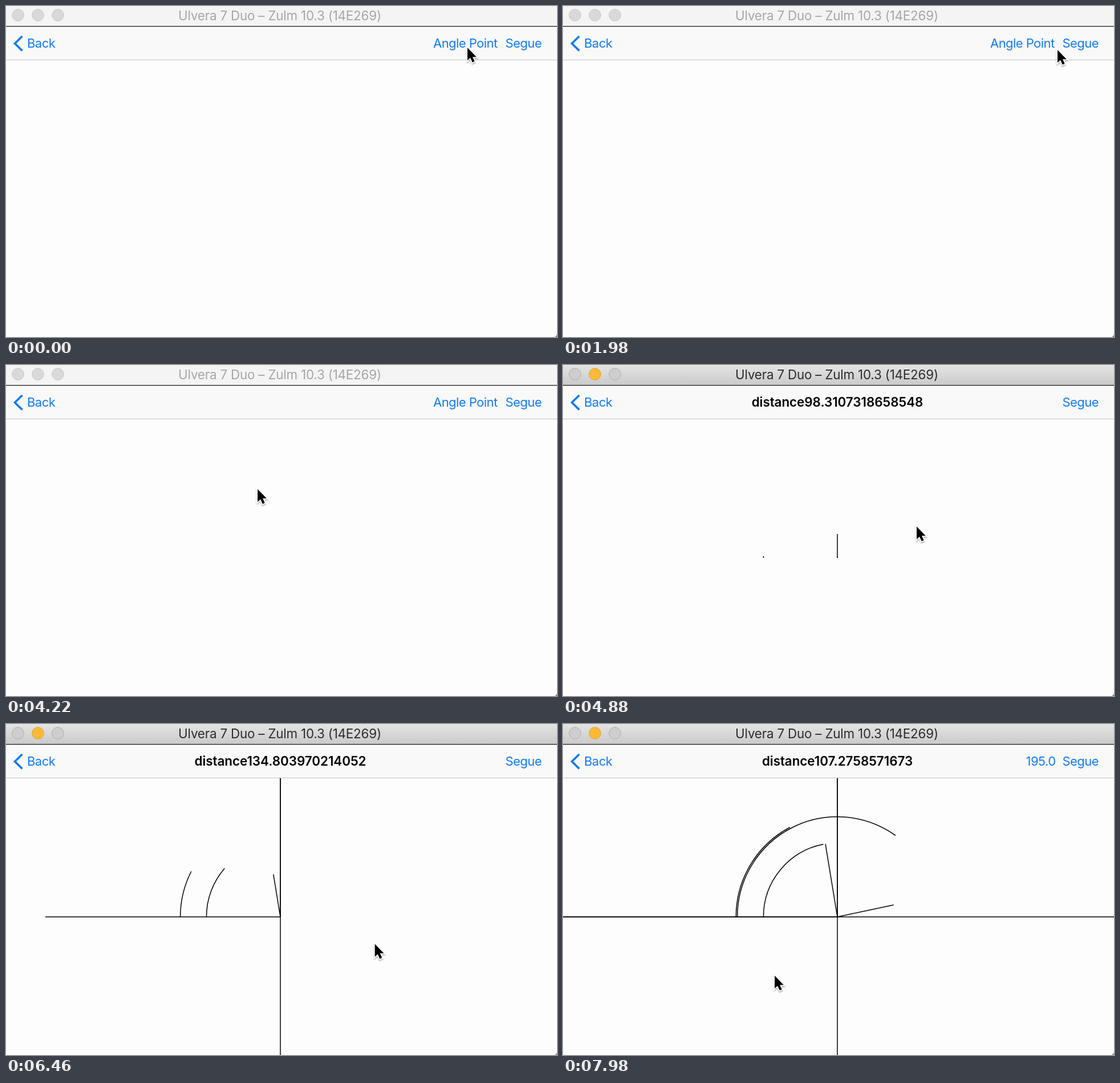
Animation of 966x580 px, one loop 8000 ms. Source, as an HTML page:

```html
<!DOCTYPE html>
<html lang="en">
<head>
<meta charset="utf-8">
<title>Angle point</title>
<style>
  html, body { margin: 0; width: 100%; height: 100%; overflow: hidden; background: #fdfdfd; }
  svg { display: block; width: 966px; height: 580px; }
  text { font-family: Inter, "Open Sans", sans-serif; font-size: 22px; letter-spacing: -.55px; }
  .link { fill: #117bf6; }
  .heading { font-size: 22.4px; font-weight: 600; letter-spacing: -.04px; text-anchor: middle; }
  .caption { font-size: 22.4px; letter-spacing: -.2px; text-anchor: middle; fill: #a6a6a6; }
  .lights circle { fill: #d9d9d9; stroke: #c8c8c8; }
  .active .caption { fill: #2c2c2c; }
  .active .lights circle { fill: #cecece; stroke: #aeaeae; }
  .active .lights .middle { fill: #fbb935; stroke: #e0a23a; }
  .bar { fill: #f4f4f4; }
  .active .bar { fill: url(#chrome); }
  #drawing path { fill: none; stroke: #000; stroke-width: 1.5; }
</style>
</head>
<body>
<svg id="stage" viewBox="0 0 966 580">
  <defs>
    <linearGradient id="chrome" x2="0" y2="1">
      <stop stop-color="#e4e4e4"/><stop offset="1" stop-color="#cacaca"/>
    </linearGradient>
    <filter id="shadow" x="-50%" y="-50%" width="200%" height="200%">
      <feDropShadow dx="0" dy="2" stdDeviation="1.3" flood-opacity=".35"/>
    </filter>
  </defs>
  <rect width="966" height="580" fill="#fdfdfd"/>
  <g id="drawing"></g>
  <rect y="36" width="966" height="58" fill="#f9f9f9"/>
  <path d="M0 94.5H966" stroke="#c3c3c7"/>
  <rect class="bar" width="966" height="35"/>
  <path d="M0 35.6H966" stroke="#17171c" stroke-width="1.3"/>
  <g class="lights">
    <circle cx="21" cy="16" r="10.3"/>
    <circle cx="56" cy="16" r="10.3" class="middle"/>
    <circle cx="91" cy="16" r="10.3"/>
  </g>
  <text class="caption" x="480" y="24.5">Ulvera 7 Duo – Zulm 10.3 (14E269)</text>
  <path d="M28.5 53L15.5 65.7L28.5 78.4" fill="none" stroke="#117bf6" stroke-width="3.6"/>
  <text class="link" x="37" y="73">Back</text>
  <text class="link" id="mode" x="749" y="73">Angle Point</text>
  <text class="link" id="angle" x="863.5" y="73" text-anchor="end">195.0</text>
  <text class="link" x="875.5" y="73">Segue</text>
  <text class="heading" id="distance" x="481" y="73"></text>
  <path d="M966 575Q965 579 962 580H966Z" fill="#8a7a68"/>
  <path id="cursor" d="M0 0V22.5L5 17.7L8.7 25.8L12.6 24L9 16.2H15.8Z" fill="#000"
        stroke="#fff" stroke-width="3" paint-order="stroke" filter="url(#shadow)"/>
</svg>
<script>
const LOOP = 8000, WIDTH = 966, HEIGHT = 580, TOP = 36;
const CX = 481, CY = 338, SCALE = 1.318;
const $ = id => document.getElementById(id);

const linear = x => x;
const easeIn = x => x * x;
const easeInOut = x => x * x * (3 - 2 * x);
const mix = (a, b, x) => a + (b - a) * x;

// Progress from 0 to 1 over a span of time.
const span = (start, duration, ease = linear) => t =>
  ease(Math.min(1, Math.max(0, (t - start) / duration)));

// Each touch shows its distance, sweeps an arc to its angle and draws a ray there.
const touches = [
  { at: 4590, distance: 98.3107318658548, angle: 80.7,
    arc: span(4590, 3700, easeInOut), ray: span(4650, 3260, easeInOut) },
  { at: 5145, distance: 133.05178824135, angle: 168,
    arc: span(5145, 3280, easeIn), ray: span(7100, 1600, easeInOut) },
  { at: 6390, distance: 134.803970214052, angle: 195,
    arc: span(6390, 2820, easeIn) },
  { at: 7800, distance: 107.2758571673 }
];

const upDown = span(4825, 1128);
const leftRight = span(5953, 1784);
const modeFade = span(4580, 280);
const angleFade = span(7080, 350);

const stops = [
  { at: 0, x: 809, y: 73 }, { at: 1980, x: 867, y: 77 }, { at: 3240, x: 357, y: 247 },
  { at: 4590, x: 460, y: 211 }, { at: 4880, x: 620, y: 283 }, { at: 5760, x: 654, y: 367 },
  { at: 6390, x: 652, y: 384 }, { at: 7120, x: 451, y: 445 }, { at: LOOP, x: 371, y: 441 }
];

function addPath() {
  const path = document.createElementNS("http://www.w3.org/2000/svg", "path");
  $("drawing").append(path);
  return d => path.setAttribute("d", d);
}

// Angles run clockwise in degrees from the left half of the axis.
function polar(radius, degrees) {
  const a = degrees * Math.PI / 180;
  return `${CX - radius * Math.cos(a)} ${CY - radius * Math.sin(a)}`;
}

function arc({ distance, angle, arc: progress }) {
  const draw = addPath(), r = distance * SCALE;
  return t => {
    const a = angle * progress(t);
    draw(a > 0 ? `M${polar(r, 0)}A${r} ${r} 0 ${+(a > 180)} 1 ${polar(r, a)}` : "");
  };
}

function ray({ distance, angle, ray: progress }) {
  const draw = addPath();
  return t => {
    const r = distance * SCALE * progress(t);
    draw(r > 0 ? `M${CX} ${CY}L${polar(r, angle)}` : "");
  };
}

// The pen runs from the centre to the near edge, then back across to the far one.
function axis(command, centre, near, far, progress) {
  const out = addPath(), back = addPath(), reach = centre - near;
  const edge = command === "V" ? `M${CX} ${near}` : `M${near} ${CY}`;
  return t => {
    const d = progress(t) * (reach + far - near);
    out(d > 0 ? `M${CX} ${CY}${command}${centre - Math.min(d, reach)}` : "");
    back(d > reach ? `${edge}${command}${near + d - reach}` : "");
  };
}

const shapes = [
  axis("V", CY, TOP, HEIGHT, upDown),
  axis("H", CX, 0, WIDTH, leftRight),
  ...touches.filter(touch => touch.arc).map(arc),
  ...touches.filter(touch => touch.ray).map(ray)
];

function moveCursor(t) {
  const i = stops.findIndex(stop => stop.at > t);
  const from = stops[i - 1], to = stops[i];
  const x = span(from.at, to.at - from.at, easeInOut)(t);
  $("cursor").setAttribute("transform",
    `translate(${mix(from.x, to.x, x)} ${mix(from.y, to.y, x)})`);
}

function render(t) {
  shapes.forEach(draw => draw(t));
  moveCursor(t);
  $("stage").classList.toggle("active", t >= 4500);
  $("mode").style.opacity = 1 - modeFade(t);
  $("angle").style.opacity = angleFade(t);
  const touch = touches.filter(({ at }) => at <= t).pop();
  $("distance").textContent = touch ? "distance" + touch.distance : "";
}

const begin = performance.now();
function tick() {
  render(Math.max(0, performance.now() - begin) % LOOP);
  requestAnimationFrame(tick);
}
tick();
</script>
</body>
</html>
```
